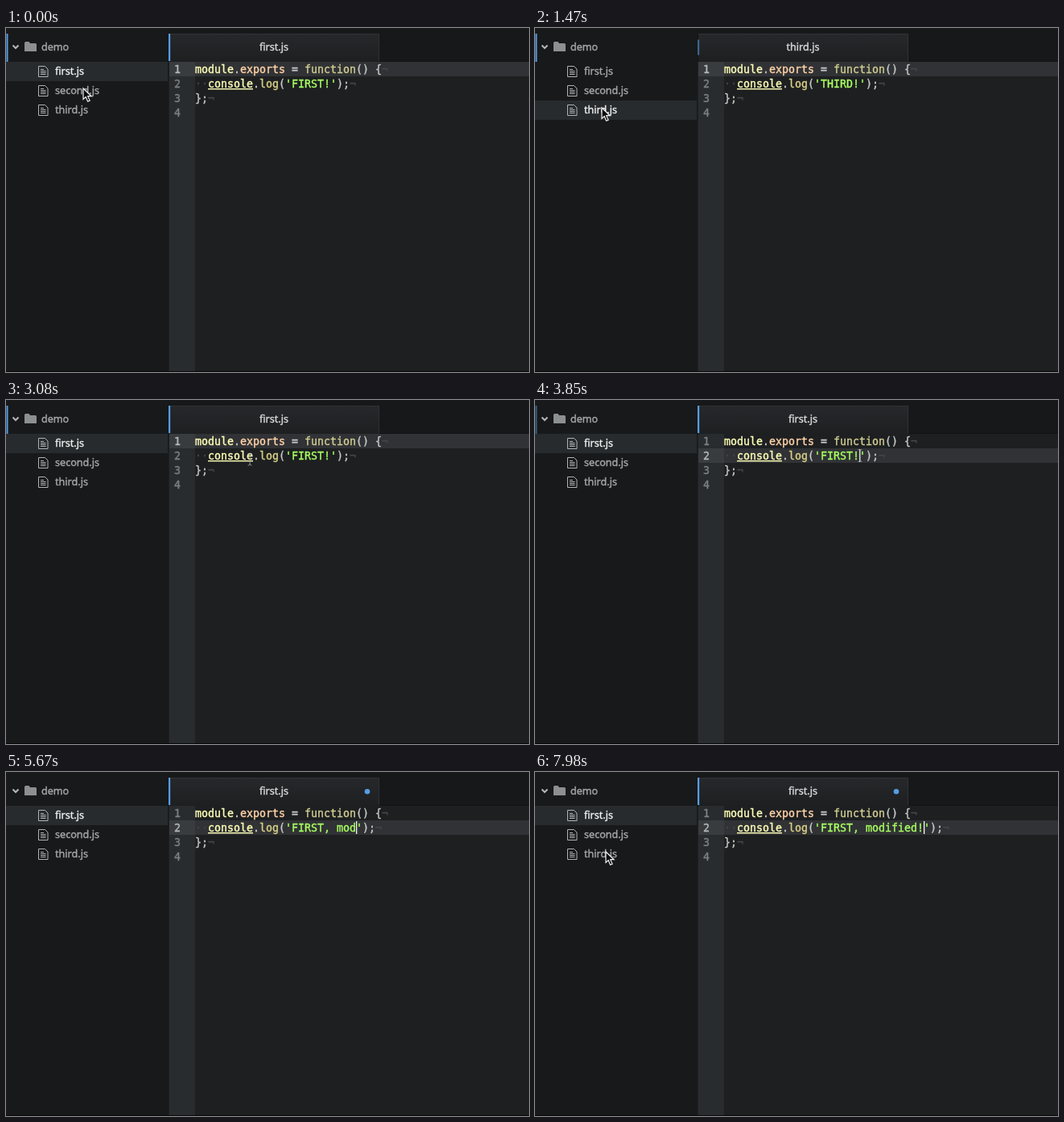
An HTML page that plays this animation: 650 px wide and 427 px high, repeating every 8 s.

```html
<!DOCTYPE html>
<html lang="en">
<head>
<meta charset="utf-8">
<style>
  html, body { margin: 0; width: 100%; height: 100%; overflow: hidden; background: #1d1f21; }
  svg { display: block; width: 650px; height: 427px; }
  text { white-space: pre; stroke-width: .4px; }
  .ui { font: 12.6px "Noto Sans", "Open Sans", sans-serif; }
  .code { font: 13.29px "DejaVu Sans Mono", monospace; }
</style>
</head>
<body>
<svg id="stage" viewBox="0 0 650 427">
  <defs>
    <linearGradient id="tabFill" x2="0" y2="1">
      <stop stop-color="#26282b"/><stop offset="1" stop-color="#1d1f21"/>
    </linearGradient>
    <g id="file" fill="none" stroke="#b0b3b5">
      <path d="M40.500 47.500h8l3.500 3.500v9.500h-11.500z"/>
      <path d="M43 51.500h4M43 53.500h6.500M43 55.500h6.500M43 57.500h6.500"/>
    </g>
    <path id="arrow" d="M0 0v13.500l3.200-2.900 2.400 5.600 2.500-1.100-2.400-5.400h4.400z"
      fill="#080808" stroke="#f2f2f2" stroke-width="1.200"/>
    <path id="beam" d="M-2.500-7.500Q0-7.500 0-5.500V5.500Q0 7.500-2.500 7.500M2.500-7.500Q0-7.500 0-5.500M0 5.500Q0 7.500 2.500 7.500"
      fill="none" stroke="#a4a6a8" stroke-width=".8"/>
  </defs>
  <rect width="650" height="427" fill="#1d1f21"/>
  <rect width="202" height="427" fill="#17191a"/>
  <rect x="202" width="448" height="41" fill="#17181a"/>
  <rect x="203" y="7" width="261" height="35" fill="url(#tabFill)"/>
  <path d="M203 7.500h261M463.500 7v34" stroke="#303234" fill="none"/>
  <path d="M464 41.500h186M202.500 7v35" stroke="#121314"/>
  <rect x="203" y="42" width="32" height="384" fill="#292c2f"/>
  <g id="view"></g>
  <path d="M0 426.500h650" stroke="#070708"/>
  <g id="pointer"></g>
</svg>
<script>
const LOOP = 8000, COL = 8, CODE_X = 235;
const PLAIN = '#c5c8c6', FAINT = '#424548', BLUE = '#569de5';
const names = ['first', 'second', 'third'];
const view = document.getElementById('view');
const pointer = document.getElementById('pointer');

// [time, file index]
const opens = [[-900, 0], [280, 1], [1260, 2], [2200, 0]];
const FOCUS = 3710, TYPING = 4900, POINTER_BACK = 7340;
const edits = [
  [TYPING, 'FIRST'], [5150, 'FIRST,'], [5290, 'FIRST, '], [5430, 'FIRST, m'],
  [5530, 'FIRST, mo'], [5640, 'FIRST, mod'], [5860, 'FIRST, modi'],
  [6060, 'FIRST, modif'], [6290, 'FIRST, modifi'], [6420, 'FIRST, modifie'],
  [6620, 'FIRST, modified'], [6900, 'FIRST, modified!']
];
// [time, x, y]
const path = [
  [0, 96, 75], [950, 96, 75], [1240, 83, 99], [1720, 83, 99], [2140, 74, 55],
  [2560, 74, 55], [2900, 210, 75], [3300, 427, 72], [3600, 404, 69],
  [POINTER_BACK, 404, 69], [7600, 250, 98], [7800, 104, 111], [7960, 88, 99], [LOOP, 88, 99]
];

const clamp = v => Math.max(0, Math.min(1, v));
const latest = (list, t) => list.filter(item => item[0] <= t).pop();
const rect = (x, y, w, h, fill, opacity = 1) =>
  `<rect x="${x}" y="${y}" width="${w}" height="${h}" fill="${fill}" opacity="${opacity}"/>`;
const text = (kind, x, y, color, str, more = '') =>
  `<text class="${kind}" x="${x}" y="${y}" fill="${color}" stroke="${color}" ${more}>${str}</text>`;

function position(t) {
  const i = Math.max(1, path.findIndex(p => p[0] > t));
  const [t0, x0, y0] = path[i - 1], [t1, x1, y1] = path[i];
  const k = clamp((t - t0) / (t1 - t0)), e = k * k * (3 - 2 * k);
  return [x0 + (x1 - x0) * e, y0 + (y1 - y0) * e];
}

function codeLine(row, tokens, highlighted) {
  let col = 0, out = '';
  for (const [str, color = PLAIN, underline] of tokens) {
    const x = CODE_X + col * COL, y = 56 + row * 18;
    out += text('code', x, y, highlighted || color === FAINT ? color : PLAIN, str);
    if (underline && highlighted) out += rect(x, y + 1, str.length * COL, 1.400, color);
    col += str.length;
  }
  return out;
}

function tree(selected, focus) {
  let out = rect(0, 42 + selected * 24, 201, 24, '#282b2d');
  out += rect(.5, 7, 2, 35, BLUE, focus);
  out += '<path d="M8.500 21.500l3.500 3.500 3.500-3.500" fill="none" stroke="#b4b7b9" stroke-width="2"/>';
  out += '<path d="M23 18.500q0-1.500 1.500-1.500h4l1.500 2h6.500q1.500 0 1.500 1.500v8.500h-15z" fill="#8d9092"/>';
  out += text('ui', 44, 28, '#a3a6a8', 'demo');
  names.forEach((name, i) => {
    out += `<use href="#file" y="${i * 24}"/>`;
    out += text('ui', 61, 58 + i * 24, i === selected ? '#eceeef' : '#a3a6a8', name + '.js');
  });
  return out;
}

function editor(t, opened, file) {
  const highlighted = t - opened > 130;
  const active = t < FOCUS ? 0 : 1;
  const message = t < TYPING ? names[file].toUpperCase() + '!' : latest(edits, t)[1];
  let out = rect(203, 42 + active * 18, 32, 18, '#393c3f');
  out += rect(235, 42 + active * 18, 415, 18, '#303235');
  for (let i = 0; i < 4; i++)
    out += text('code', 217, 56 + i * 18, i === active ? '#b5b8ba' : '#7c8083', i + 1, 'text-anchor="end"');

  out += codeLine(0, [['module', '#ffffb6'], ['.'], ['exports', '#ffd2a7'], [' = '],
    ['function', '#cfcb90'], ['() {'], ['¬', FAINT]], highlighted);
  out += codeLine(1, [['··', FAINT], ['console', '#ffffb6', true], ['.'], ['log', '#dad085'], ['('],
    [`'${message}'`, '#a8ff60'], [');'], ['¬', FAINT]], highlighted);
  out += codeLine(2, [['};'], ['¬', FAINT]], highlighted);

  const blinkedOff = t > 4250 && t < 4600 || t > 7420 && t < 7820;
  if (t >= FOCUS && !blinkedOff)
    out += rect(CODE_X + (15 + message.length) * COL, 61, 1.300, 16, '#f4f4f4');
  return out;
}

function tab(t, opened, file) {
  const grown = clamp((t - opened - 60) / 270), height = 34 * grown;
  let out = rect(202, 24 - height / 2, 2.200, height, BLUE, grown);
  out += text('ui', 333, 28, '#d6d8da', names[file] + '.js', 'text-anchor="middle"');
  if (t >= TYPING) out += '<circle cx="449" cy="24.300" r="3.300" fill="#569de5"/>';
  return out;
}

function draw(now) {
  const t = now % LOOP;
  const [opened, file] = latest(opens, t);
  const treeFocus = 1 - clamp((t - FOCUS) / 300);
  view.innerHTML = tree(file, treeFocus) + editor(t, opened, file) + tab(t, opened, file);

  const [x, y] = position(t);
  const hidden = t >= TYPING && t < POINTER_BACK;
  const shape = x > CODE_X && y > 42 ? 'beam' : 'arrow';
  pointer.innerHTML = hidden ? '' : `<use href="#${shape}" x="${x}" y="${y}"/>`;
  requestAnimationFrame(() => draw(performance.now()));
}
draw(performance.now());
</script>
</body>
</html>
```
